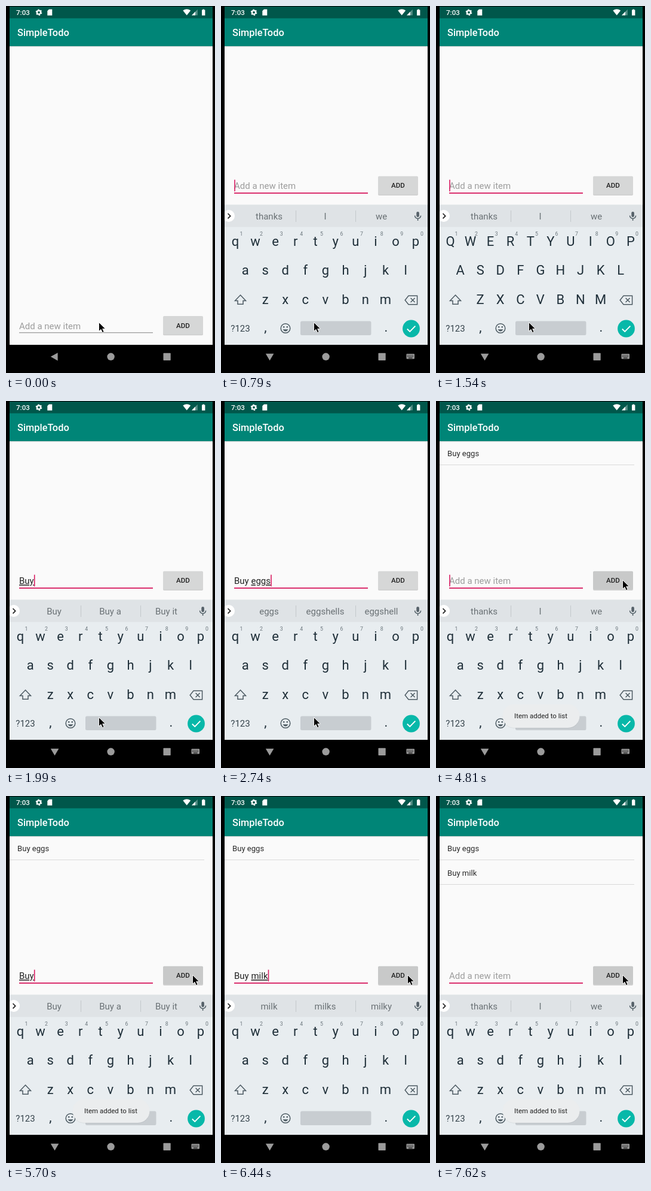
An HTML page for the animation above (8 s loop, 350 by 612 pixels).

```html
<!DOCTYPE html>
<html lang="en">
<head>
<meta charset="utf-8">
<title>Todo list</title>
<style>
  html, body { margin: 0; width: 100%; height: 100%; overflow: hidden; background: #000; }
  svg { display: block; width: 350px; height: 612px; font-family: Roboto, "Open Sans", sans-serif; }
  text { white-space: pre; }
  .mid { text-anchor: middle; }
  .bold { font-weight: 500; }
  .line { fill: none; stroke: #4d5b63; stroke-width: 1.5; }
  .keys { font-size: 22px; fill: #1f2f39; }
  .hints { font-size: 8.8px; fill: #6c777d; }
  .words { font-size: 15px; fill: #6a7175; }
  .item { font-size: 13.1px; fill: #2b2b2b; }
  #composing { text-decoration: underline; text-decoration-thickness: 1px; text-decoration-skip-ink: none; }
</style>
</head>
<body>
<svg viewBox="0 0 350 612">
  <defs>
    <clipPath id="screen"><rect x="6" y="1" width="340" height="564"/></clipPath>
    <linearGradient id="shade" x2="0" y2="1">
      <stop stop-color="#000" stop-opacity=".16"/><stop offset="1" stop-color="#000" stop-opacity="0"/>
    </linearGradient>
  </defs>
  <rect width="350" height="612"/>

  <g clip-path="url(#screen)">
    <rect x="6" y="1" width="340" height="564" fill="#fafafa"/>
    <rect x="6" y="67" width="340" height="2" fill="url(#shade)"/>
    <rect x="6" y="20" width="340" height="47" fill="#008577"/>
    <rect x="6" y="1" width="340" height="19.5" fill="#00574b"/>
    <text class="bold" x="19" y="50" font-size="16.4" fill="#fff">SimpleTodo</text>

    <g fill="#fff">
      <text class="bold" x="17" y="15" font-size="11.6">7:03</text>
      <g fill="none" stroke="#fff">
        <circle cx="55" cy="10.7" r="3" stroke-width="2.2"/>
        <circle cx="55" cy="10.7" r="4.5" stroke-width="1.6" stroke-dasharray="2.5 2.212"/>
      </g>
      <path d="M69.3 8.2L72 5.5H77.3V15.7H69.3z"/>
      <path d="M296.3 7.6Q302.7 2.8 309.2 7.6L302.7 15.6z"/>
      <path d="M311 15.6L320.8 5.8V15.6z" opacity=".35"/>
      <path d="M311 15.6L317 9.6V15.6z"/>
      <path d="M328 6.6H329.4V5.4H332V6.6H333.4V15.8H328z"/>
    </g>

    <g id="list"></g>

    <g id="form">
      <text id="hint" x="22" y="538.5" font-size="15" fill="#9c9c9c">Add a new item</text>
      <text id="entry" x="22" y="538.5" font-size="15" fill="#222"><tspan id="done"></tspan><tspan id="composing"></tspan></text>
      <rect id="rule" x="22" width="224"/>
      <rect id="caret" y="523" width="1.6" height="19.5" fill="#d81b60"/>
      <rect x="263" y="518" width="67" height="31.2" rx="2" fill="#000" opacity=".17"/>
      <rect id="button" x="263" y="517" width="67" height="30.6" rx="2"/>
      <text class="mid bold" x="296.5" y="536.7" font-size="11.6" fill="#222">ADD</text>
    </g>

    <g id="keyboard">
      <rect x="6" y="331.5" width="340" height="234" fill="#e8edf0"/>
      <rect x="6" y="331.5" width="340" height="37" fill="#dfe3e6"/>
      <circle cx="13" cy="350" r="10" fill="#fff"/>
      <path d="M11.5 346L15.7 350.2L11.5 354.4" fill="none" stroke="#222" stroke-width="1.7"/>
      <path d="M125.5 341V360M225.5 341V360" stroke="#c3c8cb"/>
      <g id="words" class="words mid"></g>
      <rect x="327.3" y="343" width="4.6" height="9" rx="2.3" fill="#566169"/>
      <path class="line" d="M324.6 349.5a5 5 0 0 0 10 0M329.6 354.5V358"/>
      <g id="keys" class="keys mid"></g>
      <g id="hints" class="hints mid"></g>

      <path class="line" d="M32.5 482L41.5 491.5H37V497.3H28V491.5H23.5z"/>
      <path class="line" d="M314 483.3H328.6V497.7H314L308.2 490.5zM317.6 487l7 7m0-7l-7 7"/>
      <text class="mid" x="32.5" y="543" font-size="15" fill="#35434b">?123</text>
      <g class="keys mid"><text x="74.5" y="543">,</text><text x="276.5" y="543">.</text></g>
      <circle class="line" cx="108" cy="537.5" r="7.8"/>
      <path d="M103.4 539.2H112.6Q108 546 103.4 539.2z" fill="#4d5b63"/>
      <g fill="#4d5b63"><circle cx="105.2" cy="535.2" r="1.3"/><circle cx="110.8" cy="535.2" r="1.3"/></g>
      <rect x="133" y="525.5" width="118.5" height="23.5" rx="2.5" fill="#c8cdd1"/>
      <circle cx="318.5" cy="538" r="14.4" fill="#08b8a9"/>
      <path d="M311.8 538.5L316.3 543L325.4 533.7" fill="none" stroke="#fff" stroke-width="1.9"/>
    </g>

    <g id="toast">
      <rect x="111.5" y="506.5" width="129" height="39.5" rx="19.7" fill="#000" opacity=".06"/>
      <rect x="111.5" y="505.7" width="129" height="39.3" rx="19.6" fill="#ebedee"/>
      <text class="mid" x="175.6" y="529.3" font-size="11.5" fill="#222">Item added to list</text>
    </g>
  </g>

  <g fill="#9b9b9b">
    <path id="back"/>
    <circle cx="175.6" cy="584.8" r="6.2"/>
    <rect x="263.5" y="578.8" width="12.2" height="12.2" rx=".8"/>
    <g id="switcher">
      <rect x="310.5" y="580" width="13.5" height="8.6" rx="1"/>
      <path d="M312 582.3H323M312 584.6H323" stroke="#000" stroke-width="1.1" stroke-dasharray="1.2 1"/>
      <path d="M314 587H320.5" stroke="#000"/>
    </g>
  </g>
  <path id="mouse" d="M0 0V15L3.5 11.8L6 17.2L8.6 16L6.2 10.8H11z" stroke="#fff" stroke-width=".9"/>
</svg>

<script>
const LOOP = 8000;
const $ = id => document.getElementById(id);
const label = (parent, x, y, text = "", cls = "") => {
  const el = document.createElementNS("http://www.w3.org/2000/svg", "text");
  el.setAttribute("x", x);
  el.setAttribute("y", y);
  el.setAttribute("class", cls);
  el.textContent = text;
  return parent.appendChild(el);
};
const show = (el, opacity) => { el.style.opacity = +opacity; };
const set = (id, attrs) => {
  for (const name in attrs) $(id).setAttribute(name, attrs[name]);
};

const keys = [];
[["qwertyuiop", 24, 400], ["asdfghjkl", 40.7, 448], ["zxcvbnm", 74.2, 497]].forEach(([row, x, y]) =>
  [...row].forEach((c, i) => keys.push([label($("keys"), x + 33.55 * i, y, c), c])));
[..."1234567890"].forEach((c, i) => label($("hints"), 34 + 33.6 * i, 383.2, c));
const words = [80.5, 174.5, 268.5].map(x => label($("words"), x, 355.8));
const items = ["Buy eggs", "Buy milk"].map((text, i) => {
  const g = document.createElementNS("http://www.w3.org/2000/svg", "g");
  $("list").append(g);
  label(g, 19, 92 + 40.6 * i, text, "item");
  g.insertAdjacentHTML("beforeend", `<path d="M6 ${106.5 + 41 * i}H332" stroke="#d9d9d9"/>`);
  return g;
});

const idle = "thanks I we";
const start = {
  focus: 0, up: 0, slide: 0, caret: 0, caps: 0, done: "", word: "", hints: idle,
  count: 0, pressed: 0, toast: 0, mouse: [155.5, 527.5]
};
const type = (word, hints, done = "Buy ") => ({ word, hints, done, caret: 1 });

// Each step changes part of the state at its time.
const steps = [
  [500, { focus: 1, caret: 1 }],
  [640, { up: 1, slide: 55 }],
  [790, { slide: 0 }],
  [940, { caret: 0 }],
  [1540, { caps: 1, caret: 1 }],
  [1690, type("B", "B But By", "")],
  [1840, { ...type("Bu", "Bu But Buy", ""), caps: 0 }],
  [1990, type("Buy", "Buy Buy_a Buy_it", "")],
  [2140, type("", "a it the")],
  [2290, type("e", "e everything eggs")],
  [2440, type("eg", "eg eggs egg")],
  [2740, type("eggs", "eggs eggshells eggshell")],
  [3030, { mouse: [205, 465] }],
  [3180, { mouse: [290, 345] }],
  [3330, { mouse: [322.5, 300], caret: 0 }],
  [3620, { pressed: 1 }],
  [3770, { done: "", word: "", caret: 1 }],
  [3920, { count: 1 }],
  [4070, { toast: .22 }],
  [4220, { toast: .7 }],
  [4360, { toast: 1, caret: 0, hints: idle }],
  [4510, { mouse: [317, 299] }],
  [4660, { mouse: [313, 298.5] }],
  [4810, { mouse: [312.5, 298.5], caret: 1 }],
  [5400, type("B", "B But By", "")],
  [5550, type("Bu", "Bu But Buy", "")],
  [5700, type("Buy", "Buy Buy_a Buy_it", "")],
  [5850, type("", "a it the")],
  [6000, type("m", "m more me")],
  [6150, { ...type("mi", "mi milk mine"), toast: .5 }],
  [6290, { ...type("mil", "mil milk mile"), toast: 0 }],
  [6440, type("milk", "milk milks milky")],
  [7030, { done: "", word: "", caret: 1 }],
  [7180, { count: 2 }],
  [7330, { toast: .22 }],
  [7470, { toast: .7, hints: idle }],
  [7620, { toast: 1, caret: 0 }]
];

function draw(s) {
  set("form", { transform: `translate(0 ${s.up ? -233.3 : 0})` });
  set("rule", s.focus
    ? { y: 544.4, height: 1.8, fill: "#d81b60" }
    : { y: 544.3, height: 1, fill: "#828282" });
  set("button", { fill: s.pressed ? "#c8c9c9" : "#d6d7d7" });

  $("done").textContent = s.done;
  $("composing").textContent = s.word;
  const filled = s.done + s.word;
  show($("hint"), !filled);
  set("caret", { x: 22.2 + (filled ? $("entry").getComputedTextLength() : 0) });
  show($("caret"), s.caret);

  show($("keyboard"), s.up ? 1 - s.slide / 130 : 0);
  set("keyboard", { transform: `translate(0 ${s.slide})` });
  keys.forEach(([el, c]) => { el.textContent = s.caps ? c.toUpperCase() : c; });
  s.hints.split(" ").forEach((word, i) => { words[i].textContent = word.replace("_", " "); });

  items.forEach((g, i) => show(g, i < s.count));
  show($("toast"), s.toast);
  show($("switcher"), s.up);
  set("back", { d: s.up ? "M74.8 579.8H88.4L81.6 591.2z" : "M74.8 584.8L86.6 578.2V591.4z" });
  set("mouse", { transform: `translate(${s.mouse})` });
}

let last = -1;
function tick() {
  const t = performance.now() % LOOP;
  const past = steps.filter(([time]) => time <= t);
  if (past.length !== last) {
    last = past.length;
    draw(Object.assign({}, start, ...past.map(step => step[1])));
  }
  requestAnimationFrame(tick);
}
tick();
</script>
</body>
</html>
```
